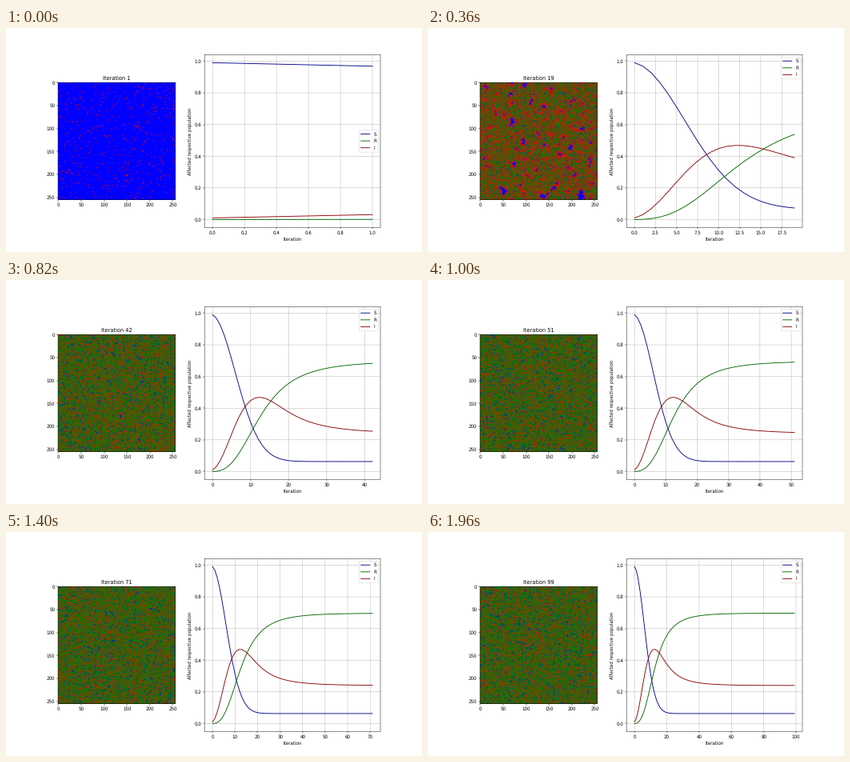
Recreate the animation shown at these times as a matplotlib script. Size 520 px wide and 280 px high, loop 1.98 s.

```python
import numpy as np
import matplotlib.pyplot as plt
from matplotlib.animation import FuncAnimation

STEPS = 99
SIZE = 256
TOTAL = SIZE * SIZE
WANING = 0.038  # share of immune cells that become susceptible again per step
S, R, I = range(3)
PALETTE = np.array([[0, 0, 255], [0, 128, 0], [255, 0, 0]], np.uint8)
rng = np.random.default_rng(7)

plt.rcParams.update({"path.snap": False, "text.hinting": "no_hinting"})

# Infection spreads over growing discs, so S falls like a Gaussian tail;
# R climbs along a skewed S-curve to its balance level.
t = np.arange(STEPS + 1)
sus = 0.063 + 0.927 * np.exp(-0.012 * t * (t + 1))
rise = 0.607 * (t / 12) ** 2.447 * np.exp(0.031 * t)
rec = 0.697 * rise / (1 + rise)
curves = [sus, rec, 1 - sus - rec]


def exposed(grid):
    """Cells with at least one infected side neighbour."""
    sick = grid == I
    return (np.roll(sick, 1, 0) | np.roll(sick, -1, 0)
            | np.roll(sick, 1, 1) | np.roll(sick, -1, 1))


def move(flat, old, new, count, first=None):
    """Switch random cells from one state to another, preferred ones first."""
    cells = rng.permutation(np.flatnonzero(flat == old))
    if first is not None:
        cells = cells[np.argsort(~first[cells], kind="stable")]
    flat[cells[:max(int(count), 0)]] = new


def simulate():
    grid = np.full((SIZE, SIZE), S, np.uint8)
    flat = grid.ravel()
    move(flat, S, I, TOTAL * 0.01)
    states = [grid.copy()]
    for k in t[1:]:
        near = exposed(grid).ravel()
        move(flat, R, S, WANING * np.sum(flat == R))
        move(flat, S, I, np.sum(flat == S) - sus[k] * TOTAL, near)
        move(flat, I, R, rec[k] * TOTAL - np.sum(flat == R))
        states.append(grid.copy())
    return states


states = simulate()

fig, (ax_map, ax) = plt.subplots(
    1, 2, figsize=(13, 7), dpi=40, gridspec_kw={"width_ratios": [1, 1.5]})
image = ax_map.imshow(PALETTE[states[1]], interpolation="bilinear")
title = ax_map.set_title("Iteration 1")

lines = [ax.plot([], [], color=color, lw=1.6, label=label)[0]
         for label, color in zip("SRI", ["darkblue", "darkgreen", "darkred"])]
ax.set_xlabel("Iteration")
ax.set_ylabel("Affected respective population")
ax.grid()
ax.legend(loc="best")


def draw(i):
    k = i + 1
    image.set_data(PALETTE[states[k]])
    title.set_text(f"Iteration {k}")
    for line, curve in zip(lines, curves):
        line.set_data(t[:k + 1], curve[:k + 1])
    ax.relim()
    ax.autoscale_view()
    return [image, title, *lines]


anim = FuncAnimation(fig, draw, frames=STEPS, interval=20, repeat=True,
                     repeat_delay=0, blit=False)
plt.show()
```
